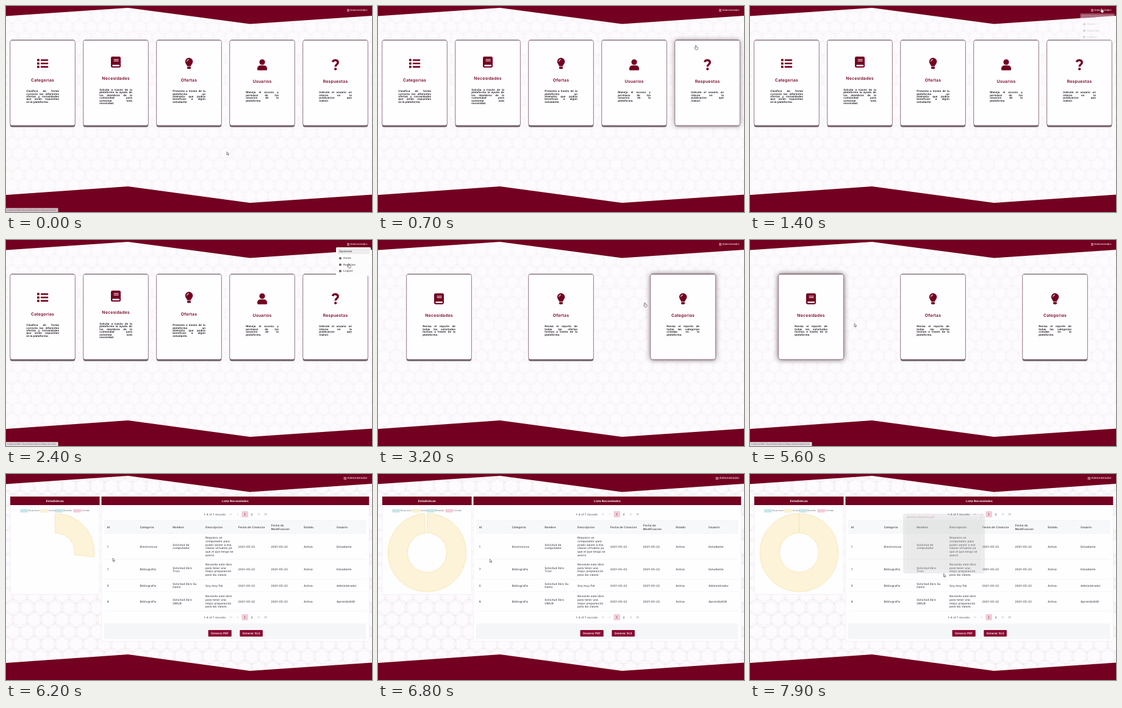
Animation of 600x338 px, one loop 8 s. Source, as an HTML page with a canvas:

```html
<!DOCTYPE html>
<html lang="es">
<head>
<meta charset="utf-8">
<title>Panel de administración</title>
<style>
html, body { margin: 0; width: 100%; height: 100%; overflow: hidden; background: #fdfbfd; }
canvas { display: block; width: 100vw; height: 100vh; }
</style>
</head>
<body>
<canvas id="stage"></canvas>
<script>
const W = 600, H = 338, LOOP = 8000;
const RED = '#730020', INK = '#1d1a1c', SANS = 'Inter, sans-serif';
const MENU_PAGE_END = 2650, REPORT_START = 6130;
const canvas = document.getElementById('stage');
const ctx = canvas.getContext('2d');

const clamp = v => Math.max(0, Math.min(1, v));
const ramp = (t, from, len) => clamp((t - from) / len);

function text(str, x, y, size, o = {}) {
  const { color = INK, weight = 500, align = 'left', family = SANS, spacing = 0.03 } = o;
  ctx.font = `${weight} ${size}px ${family}`;
  ctx.letterSpacing = `${size * spacing}px`;
  ctx.textAlign = align;
  ctx.textBaseline = 'middle';
  ctx.fillStyle = color;
  ctx.fillText(str, x, y);
}

function rect(x, y, w, h, color) {
  ctx.fillStyle = color;
  ctx.fillRect(x, y, w, h);
}

function round(x, y, w, h, r, color) {
  ctx.beginPath();
  ctx.roundRect(x, y, w, h, r);
  ctx.fillStyle = color;
  ctx.fill();
}

function poly(points, color) {
  ctx.beginPath();
  points.forEach(([x, y]) => ctx.lineTo(x, y));
  ctx.closePath();
  ctx.fillStyle = color;
  ctx.fill();
}

function line(points, width, color) {
  ctx.beginPath();
  points.forEach(([x, y]) => ctx.lineTo(x, y));
  ctx.lineWidth = width;
  ctx.strokeStyle = color;
  ctx.stroke();
}

// Interlaced circles on a triangular lattice
function backdrop(step, color) {
  rect(0, 0, W, H, '#fdfbfd');
  ctx.beginPath();
  const rise = step * Math.sqrt(3) / 2, r = step * 0.58;
  for (let row = 0; row * rise < H + step; row++) {
    for (let x = (row % 2) * step / 2; x < W + step; x += step) {
      ctx.moveTo(x + r, row * rise);
      ctx.arc(x, row * rise, r, 0, 7);
    }
  }
  ctx.lineWidth = 0.6;
  ctx.strokeStyle = color;
  ctx.stroke();
  poly([[0, 0], [600, 0], [600, 16], [400, 29.5], [200, 3], [0, 16.5]], RED);
  poly([[0, 310], [200, 296], [400, 323], [600, 309.5], [600, 338], [0, 338]], RED);
}

function account(x, size) {
  const color = '#f3e6ea';
  for (let i = -1; i <= 1; i++) rect(x, 6.7 + i * 1.5, size, 0.7, color);
  text('Administrador', 592.5, 7, size, { color, align: 'right', spacing: 0.01 });
}

const icons = {
  list() {
    for (const y of [-5.6, 0, 5.6]) {
      round(-9, y - 1.9, 3.8, 3.8, 0.7, RED);
      round(-3.2, y - 1.3, 12.4, 2.6, 0.7, RED);
    }
  },
  book() {
    round(-8, -9, 16, 18, 2.4, RED);
    rect(-3.4, -4.8, 8, 1, '#fff');
    rect(-3.4, -2.4, 8, 1, '#fff');
    round(-5.8, 4.4, 12, 2.4, 1.2, '#fff');
  },
  bulb() {
    ctx.beginPath();
    ctx.arc(0, -3, 6.2, 2.6, 0.54);
    ctx.quadraticCurveTo(3.4, 2.6, 3, 4.5);
    ctx.lineTo(-3, 4.5);
    ctx.quadraticCurveTo(-3.4, 2.6, -5.3, 0.2);
    ctx.fillStyle = RED;
    ctx.fill();
    round(-3, 5.2, 6, 3.8, 1.4, RED);
    ctx.beginPath();
    ctx.arc(0, -3, 3.5, Math.PI, Math.PI * 1.5);
    ctx.lineWidth = 1;
    ctx.strokeStyle = '#fff';
    ctx.stroke();
  },
  user() {
    ctx.beginPath();
    ctx.arc(0, -4.5, 4.6, 0, 7);
    ctx.fillStyle = RED;
    ctx.fill();
    round(-8, 1, 16, 8, [5, 5, 1.5, 1.5], RED);
  },
  ask() {
    ctx.beginPath();
    ctx.moveTo(-4.6, -4.6);
    ctx.bezierCurveTo(-3, -9, 4.2, -8.4, 4.2, -3.7);
    ctx.bezierCurveTo(4.2, -0.6, 0.2, -0.8, 0.2, 3);
    ctx.lineWidth = 3.4;
    ctx.strokeStyle = RED;
    ctx.stroke();
    ctx.beginPath();
    ctx.arc(0.2, 6.9, 2.1, 0, 7);
    ctx.fillStyle = RED;
    ctx.fill();
  }
};

function justify(str, x, y, width, isLast) {
  const style = { weight: 600, color: '#151113', spacing: 0.01 };
  const size = 4.45;
  if (isLast) return text(str, x, y, size, style);
  const words = str.split(' ');
  ctx.font = `600 ${size}px ${SANS}`;
  ctx.letterSpacing = `${size * style.spacing}px`;
  const widths = words.map(w => ctx.measureText(w).width);
  const gap = (width - widths.reduce((a, b) => a + b, 0)) / (words.length - 1);
  words.forEach((word, i) => {
    text(word, x, y, size, style);
    x += widths[i] + gap;
  });
}

function card(c, hover) {
  const x = c.cx - 53.3, y = 56, w = 106.6, h = 140;
  if (hover > 0) {
    ctx.save();
    ctx.shadowColor = `rgba(30,10,18,${0.75 * hover})`;
    ctx.shadowBlur = 9 * canvas.width / W;
    round(x, y, w, h, 3, '#fff');
    ctx.restore();
  }
  if (hover < 1) round(x, y + 4, w, h - 1.3, 3.5, `rgba(98,86,92,${0.9 * (1 - hover)})`);
  round(x, y, w, h, 3, '#fefdff');
  ctx.lineWidth = 0.75;
  ctx.strokeStyle = '#80596a';
  ctx.stroke();
  line([[x + 2, y], [x + w - 2, y]], 0.7, '#55464e');

  const lines = c.body.split('|');
  const shift = (4 - lines.length) * 2.2;
  ctx.save();
  ctx.translate(c.cx, 96.5 + shift);
  icons[c.icon]();
  ctx.restore();
  text(c.title, c.cx, 123.8 + shift, 6.8, { weight: 600, color: RED, align: 'center', spacing: 0.035 });
  lines.forEach((s, i) =>
    justify(s, c.cx - 26.7, 142 + shift + i * 4.45, 53.6, i === lines.length - 1));
}

// hover: [enter, leave]
const homeCards = [
  { cx: 60, icon: 'list', title: 'Categorias',
    body: 'Clasifica de forma|correcta las diferentes|ofertas y necesidades|que serán expuestas|en la plataforma.' },
  { cx: 180, icon: 'book', title: 'Necesidades',
    body: 'Solicita a través de la|plataforma la ayuda de|los miembros de la|comunidad para|solventar esta|necesidad.' },
  { cx: 300, icon: 'bulb', title: 'Ofertas',
    body: 'Presenta a través de la|plataforma un|elemento que podría|beneficiar a algún|estudiante.' },
  { cx: 420, icon: 'user', title: 'Usuarios', hover: [250, 510],
    body: 'Maneja el acceso y|permisos de los|usuarios de la|plataforma.' },
  { cx: 540, icon: 'ask', title: 'Respuestas', hover: [570, 780],
    body: 'Indicale al usuario un|interes en la|publicacion que|realizó.' }
];
const reportCards = [
  { cx: 100, icon: 'book', title: 'Necesidades', hover: [3680, 9000],
    body: 'Revisa el reporte de|todas las solicitudes|hechas a través de la|plataforma.' },
  { cx: 300, icon: 'bulb', title: 'Ofertas', hover: [3360, 3550],
    body: 'Revisa el reporte de|todas las ofertas|hechas a través de la|plataforma.' },
  { cx: 500, icon: 'bulb', title: 'Categorias', hover: [3030, 3170],
    body: 'Revisa el reporte de|todas las categorias|creadas en la|plataforma.' }
];

function cards(list, t) {
  backdrop(20, '#f2edf1');
  account(559, 4.1);
  for (const c of list) {
    const [on, off] = c.hover || [9000, 9000];
    card(c, Math.min(ramp(t, on, 200), 1 - ramp(t, off, 200)));
  }
}

function menu(alpha) {
  if (alpha <= 0) return;
  ctx.save();
  ctx.globalAlpha = alpha;
  round(541, 12, 57, 46.5, 1.5, '#fdfcfd');
  rect(543, 14, 53, 9, '#efecee');
  text('Opciones', 546, 18.5, 4.4, { weight: 600, color: '#4c4448' });
  ['Home', 'Reportes', 'Logout'].forEach((label, i) => {
    const y = 30 + i * 10.5;
    round(546, y - 1.8, 3.8, 3.6, 0.8, '#6d6469');
    text(label, 553, y, 4.4, { color: '#4c4448' });
  });
  ctx.restore();
}

function statusBar(path, width, alpha) {
  if (alpha <= 0) return;
  ctx.save();
  ctx.globalAlpha = alpha;
  round(-1, 331.6, width + 1, 8, [0, 1, 0, 0], '#e4e0e4');
  text('localhost:8081/faces/Roles/Admin/' + path, 1.5, 335.2, 3.55,
    { color: '#4d4a4e', weight: 400, family: '"Open Sans", sans-serif', spacing: 0 });
  ctx.restore();
}

function doughnut(t) {
  const p = clamp((t - 6126) / 1000);
  const end = -Math.PI / 2 + Math.PI * 2 * (1 - (1 - p) ** 4);
  ctx.beginPath();
  ctx.arc(80.5, 129, 64.3, -Math.PI / 2, end);
  ctx.arc(80.5, 129, 32.2, end, -Math.PI / 2, true);
  ctx.closePath();
  ctx.fillStyle = '#fcf3d8';
  ctx.fill();
  ctx.lineWidth = 0.8;
  ctx.strokeStyle = '#f5e5ac';
  ctx.stroke();
}

function panel(x, w, bottom, title) {
  rect(x, 37, w, bottom - 37, '#fefdff');
  ctx.lineWidth = 0.5;
  ctx.strokeStyle = '#ebe6ea';
  ctx.strokeRect(x, 37, w, bottom - 37);
  rect(x, 37, w, 14, RED);
  text(title, x + w / 2, 44.3, 4.7, { color: '#fff', weight: 700, align: 'center', spacing: 0.02 });
}

function chevrons(x, y, dir, count) {
  for (let i = 0; i < count; i++) {
    const c = x + (i - (count - 1) / 2) * 2;
    line([[c - dir * 0.7, y - 1.5], [c + dir * 0.7, y], [c - dir * 0.7, y + 1.5]], 0.6,
      dir < 0 ? '#bbb5b9' : '#71686d');
  }
}

function pager(y) {
  text('1-4 of 7 records', 324.5, y + 0.3, 4.5, { color: '#5d575b', spacing: 0.02 });
  chevrons(368.5, y, -1, 2);
  chevrons(380, y, -1, 1);
  round(386.5, y - 5, 10.3, 10, 1, '#f0cbd5');
  text('1', 391.6, y + 0.3, 4.6, { align: 'center', color: RED });
  text('2', 403, y + 0.3, 4.6, { align: 'center', color: '#4c4549' });
  chevrons(414.5, y, 1, 1);
  chevrons(425.7, y, 1, 2);
}

const colX = i => 165.7 + i * 53.75;
function row(cells, y, style) {
  cells.forEach((cell, i) => {
    const lines = cell.split('|');
    lines.forEach((s, k) => text(s, colX(i), y + (k - (lines.length - 1) / 2) * 5.65, 4.6, style));
  });
}

const DAY = '2021-05-22';
const bookNote = 'Necesito este libro|para tener una|mejor preparación|para las clases';
const rows = [
  { y: 119.2, bottom: 140, cells: ['1', 'Electronicos', 'Solicitud de|computador',
    'Requiero un|computador para|poder asistir a mis|clases virtuales ya|que el que tengo se|averió',
    DAY, DAY, 'Activa', 'Estudiante'] },
  { y: 157, bottom: 173, cells: ['7', 'Bibliografia', 'Solicitud libro|Trovi', bookNote, DAY, DAY, 'Activa', 'Estudiante'] },
  { y: 183.2, bottom: 193, cells: ['5', 'Bibliografia', 'Solicitud libro Su|tramo', 'Soy muy fiel', DAY, DAY, 'Activa', 'Administrador'] },
  { y: 209.3, bottom: 225, cells: ['8', 'Bibliografia', 'Solicitud libro|OMUR', bookNote, DAY, DAY, 'Activa', 'Aprendiz408'] }
];
const legend = [
  [24, 'En proceso', '#c9e9ec', '#9fd0d8'], [57, 'Activa', '#fcf3d8', '#f3dfa0'],
  [81, 'Resuelta', '#c9e9ec', '#9fd0d8'], [111, 'Cerrada', '#f8cfdb', '#eaa9bd']
];

function button(x, w, label) {
  round(x, 256, w, 10.8, 1, '#8a0a31');
  text(label, x + w / 2, 261.7, 4.6, { color: '#fff', weight: 600, align: 'center', spacing: 0.02 });
}

function report(t) {
  backdrop(23, '#e7dee4');
  account(553.5, 4.8);

  panel(7, 146.5, 197.5, 'Estadísticas');
  for (const [x, label, fill, edge] of legend) {
    rect(x, 58.3, 11.2, 4, fill);
    ctx.lineWidth = 0.6;
    ctx.strokeStyle = edge;
    ctx.strokeRect(x, 58.3, 11.2, 4);
    text(label, x + 12.8, 60.4, 3.9, { color: '#555', weight: 400, family: '"Liberation Serif", serif', spacing: 0.02 });
  }
  doughnut(t);

  panel(156.5, 438.7, 274.5, 'Lista Necesidades');
  pager(66);
  rect(161, 76, 429.5, 21.2, '#f7f8f9');
  row(['Id', 'Categoria', 'Nombre', 'Descripcion', 'Fecha de Creacion', 'Fecha de|Modificacion', 'Estado', 'Usuario'],
    87.4, { weight: 600, color: '#4a4448', spacing: 0.03 });
  line([[161, 76], [590.5, 76]], 0.5, '#e9e9ec');
  line([[161, 97.2], [590.5, 97.2]], 0.5, '#e9e9ec');
  for (const r of rows) {
    row(r.cells, r.y, { color: '#454044' });
    line([[161, r.bottom], [590.5, r.bottom]], 0.5, '#e9e9ec');
  }
  pager(235);
  rect(161, 245.5, 429.5, 25.5, '#f5f6f8');
  button(331.5, 38.2, 'Generar PDF');
  button(383.3, 37.6, 'Generar XLS');
}

function dialog(alpha) {
  if (alpha <= 0) return;
  ctx.save();
  ctx.globalAlpha = alpha;
  ctx.shadowColor = 'rgba(0,0,0,.45)';
  ctx.shadowBlur = 4 * canvas.width / W;
  round(252.5, 66.5, 131, 95, 1.5, '#fefdff');
  ctx.shadowColor = 'transparent';
  ctx.lineWidth = 0.6;
  ctx.strokeStyle = '#77676e';
  ctx.stroke();
  text('Generar Reporte pdf', 256.5, 70.8, 4.4, { color: RED, weight: 600 });
  line([[377.8, 69.4], [380.6, 72.2]], 0.6, '#555');
  line([[380.6, 69.4], [377.8, 72.2]], 0.6, '#555');
  ctx.restore();
}

// [time, x, y] of the pointer tip
const route = [
  [0, 362, 239], [80, 362, 239], [900, 572, 9], [1080, 576.5, 4], [1550, 576.5, 4],
  [2250, 562, 39], [2900, 562, 39], [3200, 438, 103], [3780, 135.8, 128.5], [5250, 135.8, 128.5],
  [5600, 171, 137], [6000, 175, 138], [6200, 175, 138], [7000, 186, 140], [7240, 186, 140],
  [7420, 245, 197], [7600, 317.5, 163.5], [8000, 317.5, 163.5]
];
const handTimes = [[250, 510], [570, 780], [950, 2650], [3000, 3260], [3360, 3570], [3700, 5400]];

function pointer(t) {
  const k = Math.max(1, route.findIndex(p => p[0] > t));
  const [t0, x0, y0] = route[k - 1], [t1, x1, y1] = route[k];
  const f = clamp((t - t0) / (t1 - t0));
  ctx.save();
  ctx.translate(x0 + (x1 - x0) * f, y0 + (y1 - y0) * f);
  ctx.beginPath();
  if (handTimes.some(([a, b]) => t >= a && t < b)) {
    [[-0.7, 0], [0.6, 0], [0.7, 2.3], [3.2, 2.9], [3.2, 5.2], [2.5, 7], [-0.4, 7],
      [-2.2, 4.2], [-1.7, 3.5], [-0.7, 4.3]].forEach(p => ctx.lineTo(...p));
  } else {
    [[0, 0], [0, 5.2], [1.2, 4.2], [2, 6], [2.9, 5.6], [2.1, 3.9], [3.7, 3.7]].forEach(p => ctx.lineTo(...p));
  }
  ctx.closePath();
  ctx.fillStyle = '#fff';
  ctx.fill();
  ctx.lineWidth = 0.6;
  ctx.lineJoin = 'round';
  ctx.strokeStyle = '#3b353a';
  ctx.stroke();
  ctx.restore();
}

function draw(t) {
  if (t < MENU_PAGE_END) {
    cards(homeCards, t);
    menu(ramp(t, 1350, 200));
    statusBar('Espacios.html', 85.5, 0.85 * (1 - ramp(t, 0, 150)));
    statusBar('Reportes.html', 85.5, ramp(t, 2250, 150));
  } else if (t < REPORT_START) {
    cards(reportCards, t);
    statusBar('Reportes.html', 85.5, 1 - ramp(t, 2650, 150));
    statusBar('ReporteNecesidad.html', 101.5, ramp(t, 3950, 200));
  } else {
    report(t);
    dialog(ramp(t, 7860, 180));
  }
  pointer(t);
}

function frame(now) {
  const dpr = window.devicePixelRatio || 1;
  const w = Math.round(innerWidth * dpr), h = Math.round(innerHeight * dpr);
  if (canvas.width !== w || canvas.height !== h) {
    canvas.width = w;
    canvas.height = h;
  }
  ctx.setTransform(w / W, 0, 0, h / H, 0, 0);
  ctx.textRendering = 'geometricPrecision';
  draw(now % LOOP);
  requestAnimationFrame(frame);
}
requestAnimationFrame(frame);
</script>
</body>
</html>
```
